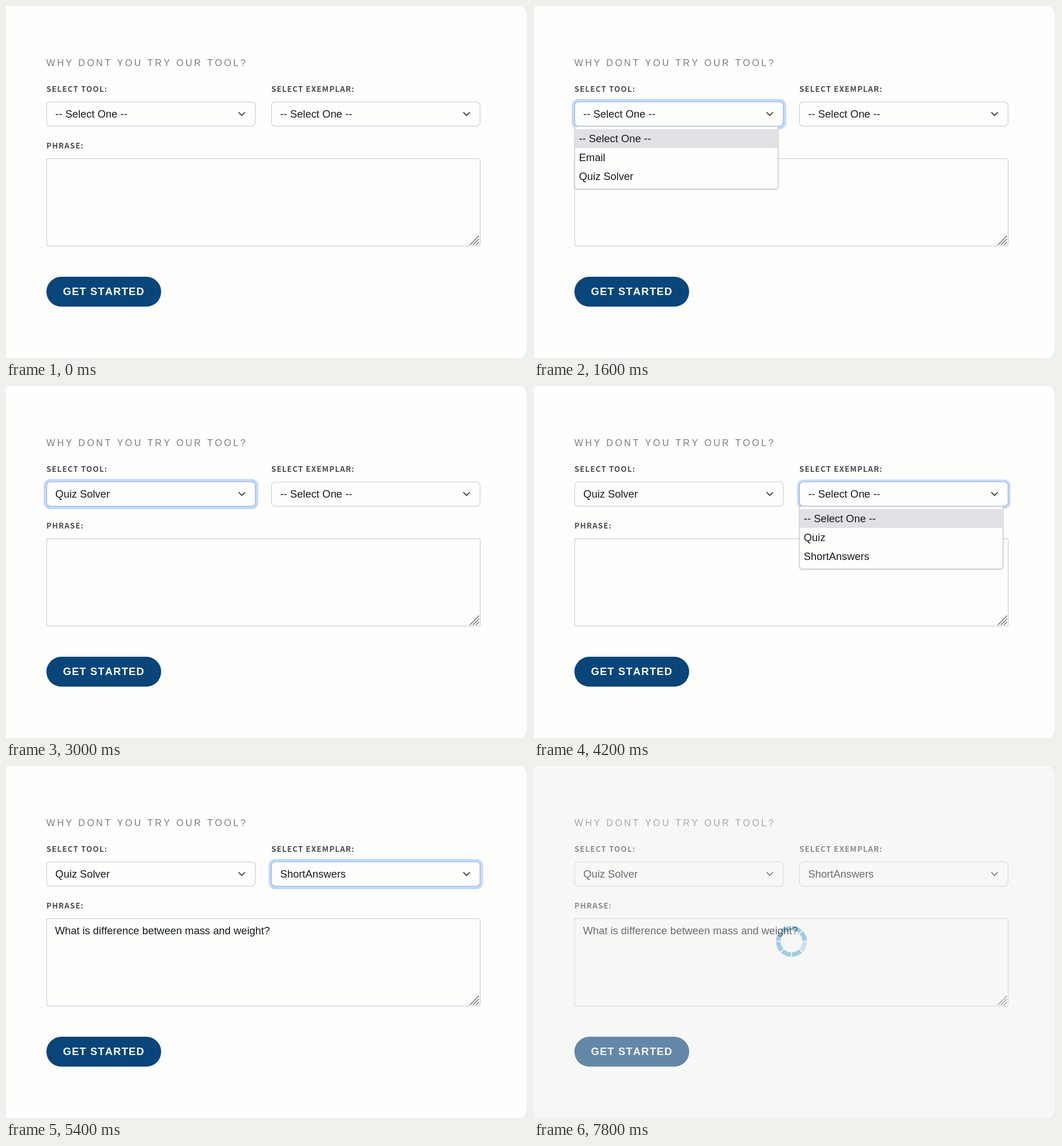
An HTML page for the animation above (8000 ms loop, 911 by 615 pixels).

```html
<!DOCTYPE html>
<html lang="en">
<head>
<meta charset="utf-8">
<title>Tool form</title>
<style>
  html, body { margin: 0; height: 100%; overflow: hidden; background: #eaf1f4; }
  svg { display: block; width: 100vw; height: 100vh; }
  text { font: 18.4px "Liberation Sans", Arial, sans-serif; font-kerning: none; fill: #16191d; white-space: pre; }
  .heading { font-size: 16.1px; letter-spacing: 3.45px; fill: #7b7c7b; }
  .label { font: bold 13.4px "Noto Sans CJK JP", "Noto Sans CJK SC", "Noto Sans CJK", sans-serif; letter-spacing: 1.13px; fill: #4b4b4d; }
  .button { font-weight: bold; letter-spacing: 1.15px; fill: #fefefd; }
  .field { fill: #fefefd; stroke: #cecfd1; stroke-width: 1.2; }
  .focus { stroke: #8fb8f3; }
  .ring { fill: #c3d9fb; }
  .line { fill: none; stroke: #2f3338; stroke-width: 1.75; stroke-linecap: round; stroke-linejoin: round; }
  .grip { stroke: #666; stroke-width: 1.25; fill: none; }
  .menu { fill: #fefefd; stroke: #c6c7cd; filter: drop-shadow(0 1px 1.5px #0003); }
  .spinner { mix-blend-mode: multiply; fill: none; stroke-width: 8; }
</style>
</head>
<body>
<svg viewBox="0 0 911 615" preserveAspectRatio="none">
  <rect width="911" height="615" fill="#eaf1f4"/>
  <rect x="-30" y="-2" width="938.5" height="619" rx="17" fill="#fefefd"/>
  <rect id="dot" width="1" height="1" fill="#999"/>
  <text class="heading" x="70.5" y="105">WHY DONT YOU TRY OUR TOOL?</text>
  <text class="label" x="70.5" y="150">SELECT TOOL:</text>
  <text class="label" x="462.9" y="150">SELECT EXEMPLAR:</text>
  <text class="label" x="70.5" y="249">PHRASE:</text>
  <rect class="field" x="71" y="266.6" width="756.5" height="152.8" rx="2.5"/>
  <path class="grip" d="M809.5 417.5L825.5 401.5M814.7 417.5L825.5 406.7M820 417.5L825.5 412"/>
  <text id="phrase" x="85.4" y="294">What is difference between mass and weight?</text>
  <rect x="70.5" y="473" width="200.3" height="52.3" rx="26.1" fill="#08457a"/>
  <text class="button" x="99.5" y="505">GET STARTED</text>
  <g id="selects"></g>
  <g id="busy">
    <rect width="911" height="615" fill="#ececeb" opacity=".4"/>
    <g id="spinner" class="spinner"></g>
  </g>
</svg>
<script>
const LOOP = 8000, STEP = 200;
const $ = id => document.getElementById(id);

function add(parent, tag, attrs, text = '') {
  const el = document.createElementNS('http://www.w3.org/2000/svg', tag);
  for (const key in attrs) el.setAttribute(key, attrs[key]);
  el.textContent = text;
  parent.append(el);
  return el;
}

const show = (el, on) => el.style.display = on ? '' : 'none';

// Last value whose start time has been reached; keys are [time, value] pairs.
const at = (keys, t) => keys.reduce((value, [start, next]) => t >= start ? next : value, null);

function makeSelect(x, options, { ring, value, hover }) {
  const g = add($('selects'), 'g', { transform: `translate(${x} 0)` });
  const halo = add(g, 'rect', { class: 'ring' });
  const box = add(g, 'rect', { x: .5, y: 167.5, width: 364, height: 42.7, rx: 6.5 });
  const label = add(g, 'text', { x: 15.6, y: 195 });
  add(g, 'path', { class: 'line', d: 'M335.7 186l5.2 5.2 5.2-5.2' });
  const menu = add(g, 'g', {});
  add(menu, 'path', { class: 'menu', d: 'M.7 210.3H355.3V315.5q0 4-4 4H4.7q-4 0-4-4z' });
  const bar = add(menu, 'rect', { x: 1.2, width: 353.6, height: 32.8, fill: '#e1e1e5' });
  options.forEach((name, i) => add(menu, 'text', { x: 7.9, y: 238 + i * 32.75 }, name));

  return t => {
    const spread = at(ring, t) || 0, row = at(hover, t);
    halo.setAttribute('x', -spread);
    halo.setAttribute('y', 167 - spread);
    halo.setAttribute('width', 365 + 2 * spread);
    halo.setAttribute('height', 43.7 + 2 * spread);
    halo.setAttribute('rx', 7 + spread);
    show(halo, spread > 0);
    box.setAttribute('class', spread ? 'field focus' : 'field');
    label.textContent = options[at(value, t)];
    show(menu, row !== null);
    bar.setAttribute('y', 215.2 + (row || 0) * 32.8);
  };
}

const selects = [
  makeSelect(70.5, ['-- Select One --', 'Email', 'Quiz Solver'], {
    ring: [[1400, 3.6], [1600, 4.6], [4200, 0]],
    value: [[0, 0], [3000, 2]],
    hover: [[1400, 0], [2200, 1], [2600, 2], [3000, null]]
  }),
  makeSelect(462.9, ['-- Select One --', 'Quiz', 'ShortAnswers'], {
    ring: [[4200, 3.6], [4400, 4.6], [7200, 0]],
    value: [[0, 0], [5400, 2]],
    hover: [[4200, 0], [4800, 2], [5200, null]]
  })
];

const segments = Array.from({ length: 8 }, (_, i) => add($('spinner'), 'circle', {
  cx: 449.3, cy: 306.5, r: 23, pathLength: 8, 'stroke-dasharray': '.9 7.1',
  transform: `rotate(${i * 45 + 2.25} 449.3 306.5)`
}));

function draw(now) {
  const t = Math.floor(now % LOOP / STEP) * STEP;
  selects.forEach(update => update(t));
  show($('dot'), t >= 800 && t < 7200);
  show($('phrase'), t >= 5400);
  show($('busy'), t >= 7200);
  $('busy').setAttribute('opacity', t < 7400 ? .92 : 1);
  const pale = (Math.floor((t - 7200) / STEP * 1.45 - 4.3) % 8 + 8) % 8;
  segments.forEach((el, i) => el.setAttribute('stroke', i === pale ? '#d2e8f5' : '#a6d5eb'));
}

const begin = performance.now();
function tick() {
  draw(performance.now() - begin);
  requestAnimationFrame(tick);
}
tick();
</script>
</body>
</html>
```
